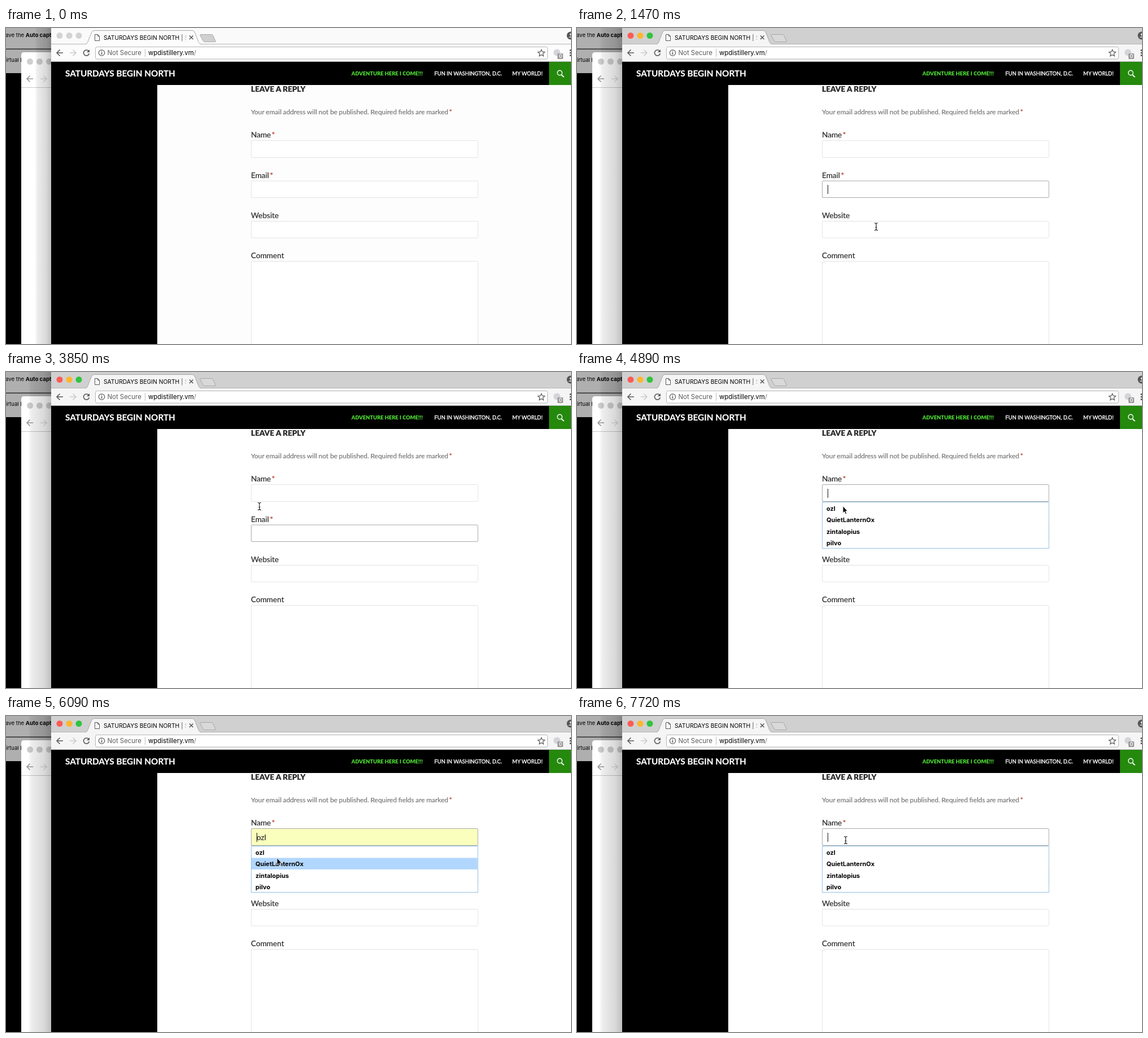
Write an HTML page that moves like this. It is 1001 px wide and 560 px high and loops after 8000 ms.

```html
<!DOCTYPE html>
<html lang="en">
<head>
<meta charset="utf-8">
<title>Comment form</title>
<style>
  html, body { margin: 0; width: 100%; height: 100%; overflow: hidden; background: #000; }
  svg { display: block; width: 1001px; height: 560px; }
  text { white-space: pre; }
  .ui { font-family: Inter, sans-serif; }
  .page { font-family: Lato, sans-serif; font-size: 13.6px; fill: #2b2b2b; stroke: #2b2b2b; stroke-width: .2; }
  .nav { font-size: 9.35px; fill: #fff; stroke: #fff; stroke-width: .35; }
  .red { fill: #c0392b; stroke: #c0392b; }
  .field { fill: #fff; stroke: #e4e4e4; }
  .line { fill: none; stroke: #5a5a5a; stroke-width: 1.6; }
  .bar { fill: var(--bar); }
  .hidden { display: none; }
</style>
</head>
<body>
<svg id="stage" viewBox="0 0 1001 560">
  <defs>
    <linearGradient id="shade">
      <stop offset="0" stop-opacity="0"/>
      <stop offset=".15" stop-opacity=".07"/>
      <stop offset=".7" stop-opacity=".15"/>
      <stop offset="1" stop-opacity=".25"/>
    </linearGradient>
    <linearGradient id="fade">
      <stop class="stop" offset="0" stop-color="#f8f8f8" stop-opacity="0"/>
      <stop class="stop" offset="1" stop-color="#f8f8f8"/>
    </linearGradient>
    <clipPath id="tabClip"><rect x="170" y="5" width="150" height="22"/></clipPath>
  </defs>

  <!-- windows behind -->
  <rect width="80" height="80" fill="#afafaf"/>
  <rect y="36.5" width="80" height="1.6" fill="#333"/>
  <g class="ui" font-size="9.6">
    <text x="-1" y="16">ave the <tspan font-weight="700">Auto capt</tspan></text>
    <text x="0" y="60">irtual I</text>
  </g>
  <path d="M27 560V48q0-5 5-5H80V560z" fill="#fff"/>
  <path d="M27 105.5H80" stroke="#c8c8c8"/>
  <g fill="#cfcfcf"><circle cx="42.5" cy="59.5" r="5.5"/><circle cx="59.5" cy="59.5" r="5.5"/><circle cx="76.5" cy="59.5" r="5.5"/></g>
  <path class="line" d="M48 90H37m5.500-5.500L37 90l5.500 5.500" style="stroke:#999"/>
  <path class="line" d="M61 90H72m-5.500-5.500L72 90l-5.500 5.500" style="stroke:#ddd"/>
  <rect id="shadow" y="0" height="560" fill="url(#shade)"/>

  <!-- browser chrome -->
  <rect id="strip" x="80" width="921" height="29"/>
  <rect class="bar" x="80" y="28" width="921" height="32"/>
  <path d="M80 28.500H1001M80 59.500H1001" stroke="#b4b4b4"/>
  <path class="bar" d="M140 29C143 28.500 144 27 145 24.500L151.500 8Q153 4.500 156 4.500H330Q333 4.500 334.500 8L341 24.500C342 27 343 28.500 347 29z"/>
  <path d="M140 28.500C143 28.500 144 27 145 24.500L151.500 8Q153 4.500 156 4.500H330Q333 4.500 334.500 8L341 24.500C342 27 343 28.500 347 28.500" fill="none" stroke="#a8a8a8"/>
  <path id="newTab" d="M345 11.500H364Q366 11.500 367 13.500L371 23Q372 24.500 370 24.500H352Q350 24.500 349 22.500L344 13Q343.500 11.500 345 11.500z" stroke="#a9a9a9"/>
  <g id="lights"><circle cx="95" cy="13.500" r="5.500"/><circle cx="112" cy="13.500" r="5.500"/><circle cx="129" cy="13.500" r="5.500"/></g>
  <path d="M157.500 11.500H162.500L165.500 14.500V22.500H157.500zM162.500 11.500V14.500H165.500" fill="#fff" stroke="#555"/>
  <text class="ui" x="173" y="20.500" font-size="10.3" clip-path="url(#tabClip)">SATURDAYS BEGIN NORTH | S</text>
  <rect x="309" y="8" width="12" height="18" fill="url(#fade)"/>
  <path class="line" d="M325 13.500l6.500 6.500m0-6.500l-6.500 6.500"/>
  <path class="line" d="M101 44H90m5.500-5.500L90 44l5.500 5.500"/>
  <path class="line" d="M113 44H124m-5.500-5.500L124 44l-5.500 5.500" style="stroke:#ccc"/>
  <path class="line" d="M146.500 41A5 5 0 1 0 147.400 45"/>
  <path d="M148 38V43H143z" fill="#5a5a5a"/>
  <rect x="158.500" y="33.500" width="801" height="21.500" rx="3" fill="#fff" stroke="#b5b5b5"/>
  <circle class="line" cx="169.500" cy="44" r="5.200" style="stroke-width:1.2"/>
  <path class="line" d="M169.500 43V47M169.500 40.700V42"/>
  <path d="M246.500 37V51" stroke="#bbb"/>
  <text class="ui" x="179.500" y="48" font-size="11.4" fill="#5a5a5a">Not Secure</text>
  <text class="ui" x="252" y="48" font-size="11.4">wpdistillery.vm<tspan fill="#777">/</tspan></text>
  <path class="line" d="M948.500 38.300l1.700 3.900 4.300.4-3.200 2.900.9 4.200-3.700-2.200-3.700 2.200.9-4.200-3.200-2.900 4.300-.4z" style="stroke-width:1.2"/>
  <circle cx="976" cy="43.500" r="6" fill="#d3d5d8"/>
  <rect x="977" y="45" width="10" height="10" rx="1.500" fill="#9a9a9a"/>
  <text class="ui" x="979.500" y="53" font-size="8.500" font-weight="600" fill="#fff">0</text>
  <g fill="#555"><circle cx="1000" cy="39.500" r="1.500"/><circle cx="1000" cy="44" r="1.500"/><circle cx="1000" cy="48.500" r="1.500"/></g>
  <circle cx="1000.500" cy="13.500" r="7" fill="#555"/>
  <circle cx="1001" cy="11.500" r="2.300" fill="#ddd"/>
  <path d="M996 17Q1001 13 1006 17z" fill="#ddd"/>

  <!-- web page -->
  <rect x="80" y="60" width="921" height="500"/>
  <rect id="paper" x="268" y="101" width="733" height="459"/>
  <g class="page">
    <text x="105" y="86" style="font-size:15.3px;font-weight:700;fill:#fff;stroke:#fff">SATURDAYS BEGIN NORTH</text>
    <text class="nav" x="612" y="84" style="font-weight:900;fill:#4fe335;stroke:none">ADVENTURE HERE I COME!!!</text>
    <text class="nav" x="759" y="84">FUN IN WASHINGTON, D.C.</text>
    <text class="nav" x="897" y="84">MY WORLD!</text>
    <text x="434" y="112.500" font-weight="900">LEAVE A REPLY</text>
    <text x="434" y="152.500" style="font-size:11.9px;word-spacing:-.25px;fill:#767676;stroke:#767676">Your email address will not be published. Required fields are marked <tspan class="red" dx="-1">*</tspan></text>
    <text x="434" y="194">Name <tspan class="red" dx="-2">*</tspan></text>
    <text x="434" y="265.500">Email <tspan class="red" dx="-2">*</tspan></text>
    <text x="434" y="336.500">Website</text>
    <text x="434" y="408">Comment</text>
  </g>
  <rect x="962" y="60" width="39" height="41" fill="#24890d"/>
  <path d="M984 83l4.500 4" stroke="#fff" stroke-width="2"/>
  <circle cx="981" cy="79.500" r="4.200" fill="none" stroke="#fff" stroke-width="1.400"/>
  <rect id="name" class="field" x="434.500" y="199.500" width="401.500" height="30" rx="1.500"/>
  <rect id="email" class="field" x="434.500" y="271" width="401.500" height="29.500" rx="1.500"/>
  <rect class="field" x="434.500" y="342.500" width="401.500" height="29.500" rx="1.500"/>
  <rect class="field" x="434.500" y="413.500" width="401.500" height="160" rx="1.500"/>
  <text id="preview" class="page" x="444" y="220"></text>
  <g id="list">
    <rect x="434.500" y="230.500" width="401.500" height="82" fill="#fff" stroke="#94c1e6"/>
    <rect id="hover" x="435" width="400.500" height="20.500" fill="#b2d7ff"/>
  </g>
  <path id="caret" d="M444.500 0V16" stroke="#111"/>
  <g id="pointer">
    <path id="beam" d="M-3-6.500Q0-6.500 0-4.500Q0-6.500 3-6.500M0-4.500V4.500M-3 6.500Q0 6.500 0 4.500Q0 6.500 3 6.500M-1.500 1.500H1.500" fill="none" stroke="#222" stroke-width="1.200"/>
    <path id="arrow" d="M0-.500V12L2.800 9.500 4.800 14 6.900 13.100 5 8.700H8.700z" fill="#111" stroke="#fff" stroke-width=".9"/>
  </g>
</svg>
<script>
const $ = id => document.getElementById(id);
const LOOP = 8000;
const ROW = 20.4;
const names = ["ozl", "QuietLanternOx", "zintalopius", "pilvo"];

names.forEach((name, i) => {
  const label = document.createElementNS("http://www.w3.org/2000/svg", "text");
  label.setAttribute("class", "ui");
  label.setAttribute("font-size", 11);
  label.setAttribute("font-weight", 700);
  label.setAttribute("x", 442);
  label.setAttribute("y", 246 + i * ROW);
  label.textContent = name;
  $("list").append(label);
});

// Each track holds [start time, value...] and keeps a value until the next start.
const pointerTrack = [
  [570, 566, 440], [720, 552, 380], [870, 540, 310], [1020, 535, 288],
  [1470, 530, 352], [1620, 537, 393], [1770, 526, 330], [1910, 506, 255], [2060, 488, 212],
  [2960, 487, 215], [3110, 486, 218], [3250, 485, 219],
  [3850, 449, 238], [4000, 453, 226], [4140, 458, 220], [4290, 465, 229], [4440, 471, 238],
  [5340, 473, 241], [5490, 475, 244], [5940, 478, 248], [6090, 480, 252],
  [6230, 481, 253], [6380, 480, 241], [6530, 479, 227], [6670, 477, 222], [6820, 476, 220]
];
const hoverTrack = [[5490, 0], [6090, 1], [6380, 0], [6530, -1]];
const previewTrack = [[5790, 0], [6230, 1], [6530, -1]];
const caretTrack = [
  [1470, 1], [2060, 0], [4000, 1], [4440, 0], [4890, 1],
  [6530, 0], [6670, 1], [7120, 0], [7720, 1]
];

const at = (track, t) => track.findLast(step => step[0] <= t);
const valueAt = (track, t, fallback) => (at(track, t) || [0, fallback])[1];
const show = (id, on) => $(id).classList.toggle("hidden", !on);
const place = (id, x, y) => $(id).setAttribute("transform", `translate(${x} ${y})`);

function render(t) {
  const active = t >= 720;
  const nameFocus = t >= 4000;
  const emailFocus = t >= 1020 && !nameFocus;
  const open = t >= 4290;

  $("stage").style.setProperty("--bar", active ? "#f5f5f5" : "#fcfcfc");
  $("strip").style.fill = active ? "#d0d0d0" : "#fafafa";
  $("newTab").style.fill = active ? "#d9d9d9" : "#d0d0d0";
  $("paper").style.fill = active ? "#fff" : "#fdfdfd";
  ["#fc5b57", "#fdb62f", "#2fc440"].forEach((color, i) => {
    $("lights").children[i].style.fill = active ? color : "#d3d3d3";
  });
  const shadowX = active ? 39 : 51;
  $("shadow").setAttribute("x", shadowX);
  $("shadow").setAttribute("width", 80 - shadowX);

  const preview = valueAt(previewTrack, t, -1);
  $("preview").textContent = names[preview] || "";
  $("name").style.fill = preview < 0 ? "#fff" : "#faffbd";
  $("name").style.stroke = nameFocus ? "#a8a8a8" : "";
  $("email").style.stroke = emailFocus ? "#a8a8a8" : "";

  const hover = valueAt(hoverTrack, t, -1);
  show("list", open);
  show("hover", hover >= 0);
  $("hover").setAttribute("y", 231 + hover * ROW);

  show("caret", valueAt(caretTrack, t, 0));
  place("caret", 0, nameFocus ? 207 : 278);

  const spot = at(pointerTrack, t);
  show("pointer", spot);
  if (spot) {
    const [, x, y] = spot;
    const overList = open && y > 230;
    place("pointer", x, y);
    show("arrow", overList);
    show("beam", !overList);
  }
}

function tick() {
  render(performance.now() % LOOP);
  requestAnimationFrame(tick);
}
tick();
</script>
</body>
</html>
```
